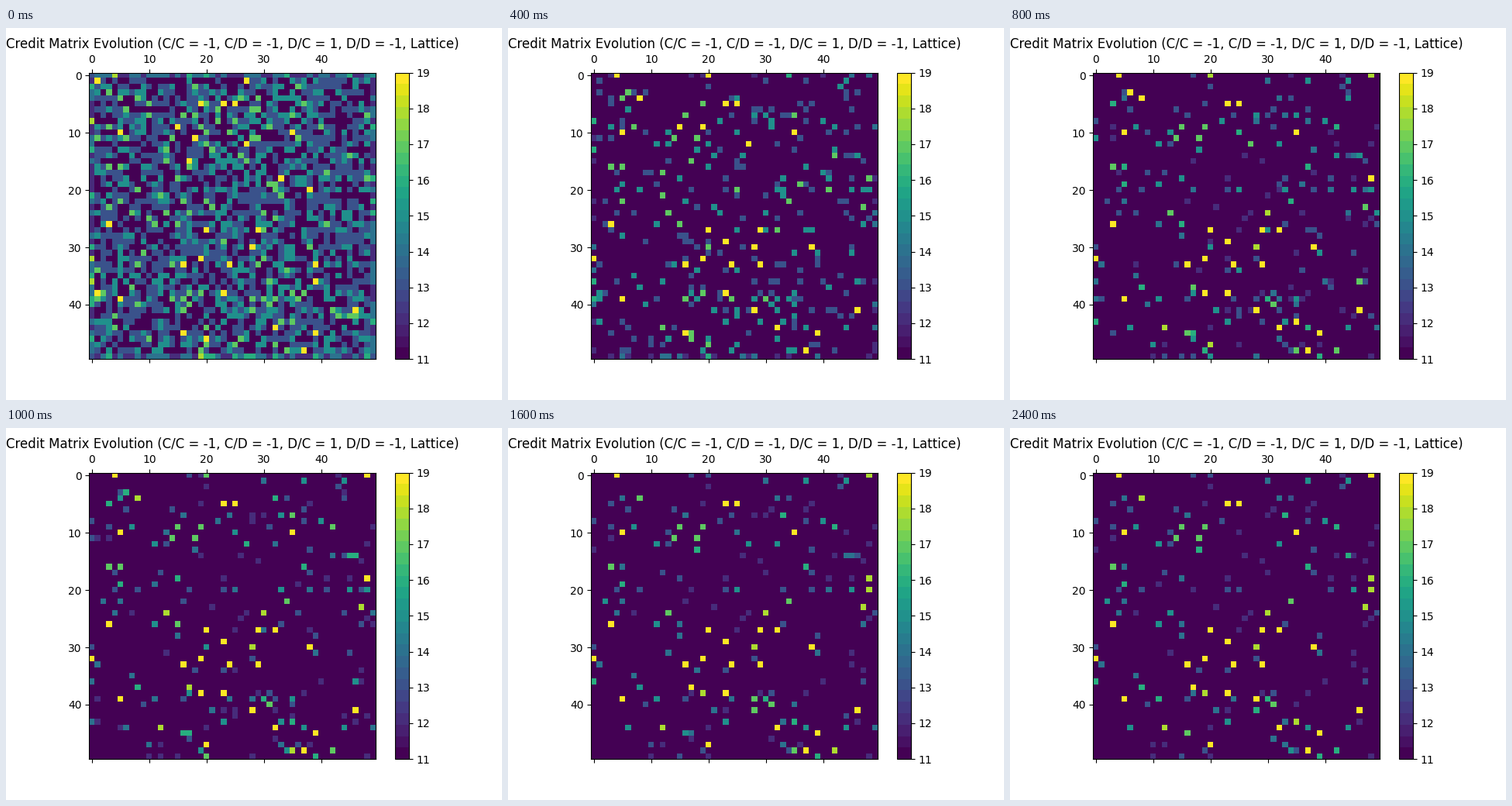
A matplotlib script for the animation above (6 s loop, 640 by 480 pixels).

```python
import numpy as np
import matplotlib.pyplot as plt
from matplotlib.animation import FuncAnimation

N = 50
LOW, HIGH = 11, 19
START = 15         # credit of every cell before the first round
RUIN = 6           # a cell below this credit stops playing
ROUNDS = 13        # the lattice rests after this many rounds
FRAMES, STEP = 30, 200

# Cells (row, column) that win every game
WINNERS = [(0, 4), (5, 25), (10, 5), (10, 35), (26, 3), (27, 20), (27, 29),
           (32, 0), (32, 19), (33, 16), (33, 24), (38, 23), (41, 46),
           (44, 32), (45, 39), (48, 37)]


def neighbours(alive):
    """Count the living cells above, below, left and right of each cell."""
    p = np.pad(alive.astype(int), 1)
    return p[:-2, 1:-1] + p[2:, 1:-1] + p[1:-1, :-2] + p[1:-1, 2:]


def play(seed):
    """Credit after each round: +1 for a win, -1 otherwise, per neighbour."""
    rng = np.random.default_rng(seed)
    skill = rng.beta(3, 14, (N, N))
    skill[tuple(zip(*WINNERS))] = 1
    credit = np.full((N, N), START)
    history = []
    for k in range(ROUNDS):
        alive = credit >= RUIN
        games = neighbours(alive) * alive
        luck = 0.06 if k == 0 else 0
        wins = rng.binomial(games, np.minimum(skill + luck, 1))
        credit = credit + 2 * wins - games
        history.append(credit)
    return history


history = play(seed=7)

fig, ax = plt.subplots(figsize=(6.4, 4.8), dpi=100)
# 25 steps give each whole credit its exact viridis colour
image = ax.matshow(history[0], cmap=plt.get_cmap("viridis", 25),
                   vmin=LOW, vmax=HIGH)
fig.colorbar(image)
ax.set_title("Credit Matrix Evolution "
             "(C/C = -1, C/D = -1, D/C = 1, D/D = -1, Lattice)")


def update(i):
    image.set_data(history[min(i, ROUNDS - 1)])
    return [image]


anim = FuncAnimation(fig, update, frames=FRAMES, interval=STEP,
                     repeat=True, repeat_delay=0)
plt.show()
```
